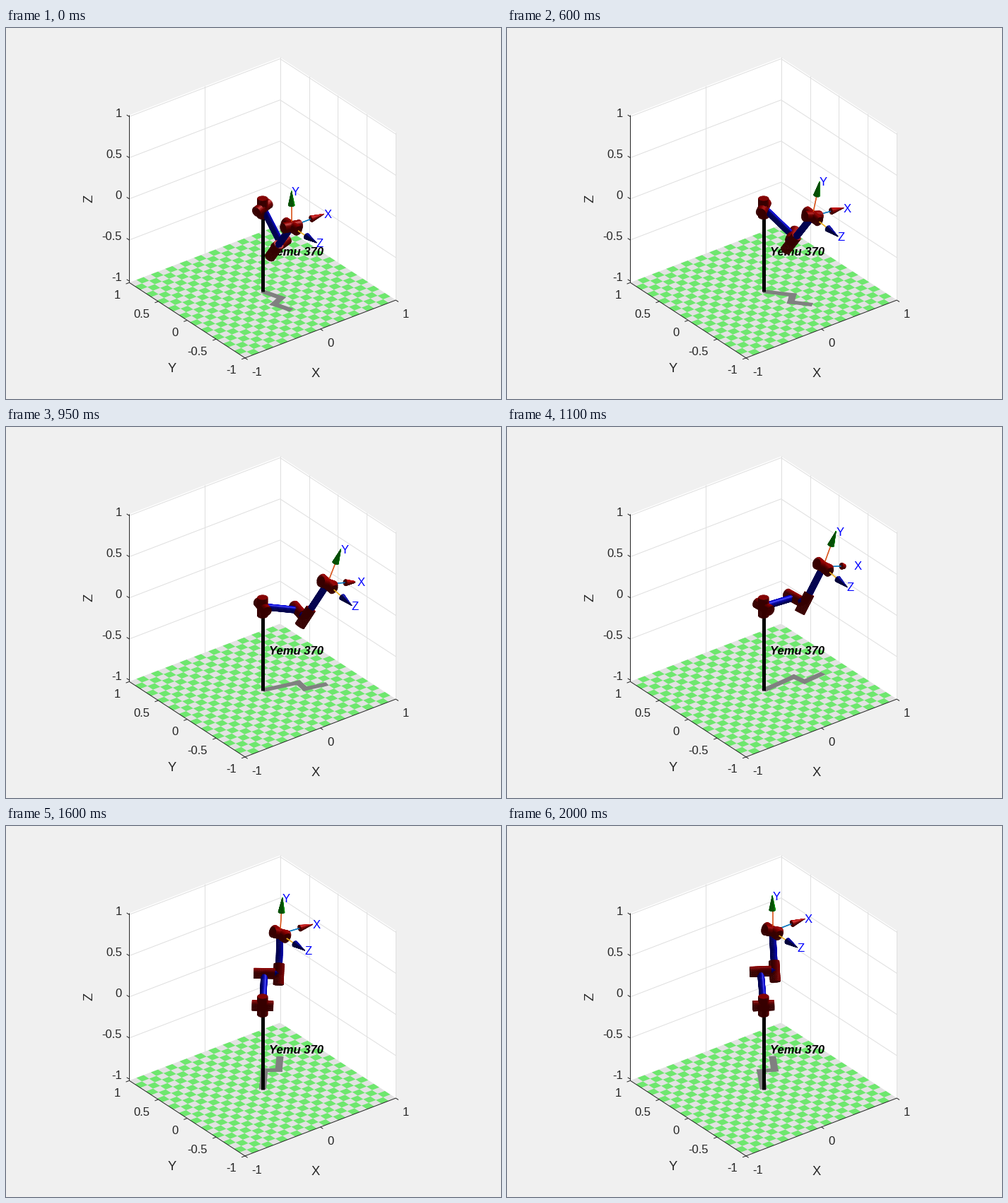
Animation of 700 by 525 pixels, one loop 2050 ms. Source, as a matplotlib script:

```python
import numpy as np
import matplotlib.pyplot as plt
from matplotlib.animation import FuncAnimation
from matplotlib.collections import PolyCollection

W, H, DPI = 700, 525, 100
FRAMES, STEP = 41, 50
FONT = 'Liberation Sans'
INK = (0.15, 0.15, 0.15)

# Orthographic camera: azimuth -37.5, elevation 30 degrees
AZ, EL, SCALE = np.radians(-37.5), np.radians(30), 134.4
CENTER = np.array([362.8, 254.2])
RIGHT = np.array([np.cos(AZ), np.sin(AZ), 0])
VIEW = np.array([np.sin(AZ) * np.cos(EL), -np.cos(AZ) * np.cos(EL), np.sin(EL)])
UP = np.cross(VIEW, RIGHT)
LIGHT = np.array([1, 0, 1]) / np.sqrt(2)
ZLIM = 1.018

# Arm geometry (Denavit-Hartenberg)
A2, A3, D3, D4 = 0.4318, 0.0203, 0.15005, 0.4318
LINKS = list(zip([0, 0, D3, D4, 0, 0], [0, A2, A3, 0, 0, 0],
                 np.array([1, 0, -1, 1, -1, 0]) * np.pi / 2))
TOOL = np.array([[1, 0, 0], [0, 0, -1], [0, 1, 0]])

JOINT_R, JOINT_L, LINK_R = 0.054, 0.11, 0.034
RED, BLUE = (0.7, 0, 0), (0, 0, 1)
TIP, CONE_BASE, CONE_R = 0.43, 0.26, 0.034
CONES = [(0.85, 0, 0), (0, 1, 0), (0, 0, 0.75)]
STEMS = [(0, 0.447, 0.741), (0.85, 0.325, 0.098), (0.929, 0.694, 0.125)]


def project(p):
    p = np.asarray(p, float)
    return CENTER + SCALE * np.stack([p @ RIGHT, -(p @ UP)], axis=-1)


def chain(q):
    """Poses of the base and of every link frame."""
    T = np.eye(4)
    out = [T]
    for qi, (d, a, al) in zip(q, LINKS):
        c, s, ca, sa = np.cos(qi), np.sin(qi), np.cos(al), np.sin(al)
        T = T @ np.array([[c, -s * ca, s * sa, a * c],
                          [s, c * ca, -c * sa, a * s],
                          [0, sa, ca, d],
                          [0, 0, 0, 1]])
        out.append(T)
    return out


def solve(x, y, z):
    """Elbow-down joint angles that bring the tool to a point."""
    r = np.hypot(x, y)
    rho = np.sqrt(r * r - D3 * D3)
    q1 = np.arctan2(y, x) + np.arcsin(D3 / r)
    dist = np.hypot(rho, z)
    bend = np.arccos((dist**2 + A2**2 - A3**2 - D4**2) / (2 * dist * A2))
    q2 = np.arctan2(z, rho) - bend
    fore = np.arctan2(z - A2 * np.sin(q2), rho - A2 * np.cos(q2))
    q3 = fore - np.arctan2(D4, A3) - q2
    M = chain([q1, q2, q3])[3][:3, :3].T @ TOOL
    return np.array([q1, q2, q3, np.arctan2(M[1, 2], M[0, 2]),
                     -np.arccos(M[2, 2]), np.arctan2(M[2, 1], -M[2, 0])])


START, END = solve(0, -0.5, 0), solve(0.5, 0.5, 0.5)


def pose(i):
    t = i / (FRAMES - 1)
    return START + (END - START) * (10 * t**3 - 15 * t**4 + 6 * t**5)


def shade(n, color):
    nl = n @ LIGHT
    refl = 2 * nl[:, None] * n - LIGHT
    spec = np.where(nl > 0, np.clip(refl @ VIEW, 0, 1)**10, 0)
    lit = 0.3 + 0.6 * np.clip(nl, 0, 1)
    return np.clip(lit[:, None] * np.array(color) + 0.3 * spec[:, None], 0, 1)


def solid(p, axis, t0, t1, r0, r1, color, n=28):
    """Visible facets of a cylinder or cone: corners and colours."""
    axis = axis / np.linalg.norm(axis)
    helper = np.eye(3)[np.argmin(np.abs(axis))]
    u = np.cross(axis, helper)
    u /= np.linalg.norm(u)
    w = np.cross(axis, u)
    m = max(2, int(np.ceil((t1 - t0) / 0.02)))
    t, r = np.linspace(t0, t1, m + 1), np.linspace(r0, r1, m + 1)
    th = np.linspace(0, 2 * np.pi, n + 1)

    def ring(a):
        return np.cos(a)[:, None] * u + np.sin(a)[:, None] * w

    grid = p + t[:, None, None] * axis + r[:, None, None] * ring(th)
    side = np.stack([grid[:-1, :-1], grid[:-1, 1:], grid[1:, 1:], grid[1:, :-1]], axis=2)
    normal = ring((th[:-1] + th[1:]) / 2) + (r0 - r1) / (t1 - t0) * axis
    normal /= np.linalg.norm(normal, axis=1)[:, None]
    quads, normals = [side.reshape(-1, 4, 3)], [np.tile(normal, (m, 1))]
    for k, sign in ((0, -1), (-1, 1)):
        mid = np.broadcast_to(p + t[k] * axis, (n, 3))
        quads.append(np.stack([mid, grid[k, :-1], grid[k, 1:], mid], axis=1))
        normals.append(np.tile(sign * axis, (n, 1)))
    quads, normals = np.concatenate(quads), np.concatenate(normals)
    seen = normals @ VIEW > 0
    return quads[seen], shade(normals[seen], color)


def rod(a, b, color):
    d = b - a
    return solid(a, d, 0, np.linalg.norm(d), LINK_R, LINK_R, color)


def stem(p, axis, color, n=16):
    """One-pixel line as thin facets facing the camera."""
    off = np.cross(VIEW, axis)
    off *= 0.5 / SCALE / max(np.linalg.norm(off), 1e-6)
    pts = p + np.linspace(0, CONE_BASE, n + 1)[:, None] * axis
    a, b = pts[:-1], pts[1:]
    return np.stack([a - off, a + off, b + off, b - off], axis=1), np.tile(color, (n, 1))


def robot(F):
    pos = [T[:3, 3] for T in F]
    parts = [solid(pos[k], F[k][:3, 2], -JOINT_L, JOINT_L, JOINT_R, JOINT_R, RED)
             for k in range(6)]
    side = pos[2] + D3 * F[2][:3, 2]
    parts += [rod(pos[1], pos[2], BLUE), rod(pos[2], side, BLUE), rod(pos[3], pos[4], BLUE)]
    for k in range(3):
        axis = F[6][:3, k]
        parts.append(stem(pos[6], axis, STEMS[k]))
        parts.append(solid(pos[6], axis, CONE_BASE, TIP, CONE_R, 0.001, CONES[k], 20))
    quads = np.concatenate([a for a, _ in parts])
    cols = np.concatenate([c for _, c in parts])
    mid = quads.mean(axis=1)
    keep = mid[:, 0] <= 1
    quads, cols, depth = quads[keep], cols[keep], (mid @ VIEW)[keep]
    order = np.argsort(depth)
    return project(quads[order]), cols[order]


def shadow(F):
    """Floor ribbon below the links."""
    pts = [F[k][:2, 3] for k in (0, 2, 3, 4)]
    half, out = 0.0375, []
    for k in range(3):
        a, b = pts[k], pts[k + 1]
        d = (b - a) / np.linalg.norm(b - a) * half
        a = a - d * (k > 0)
        b = b + d * (k < 2)
        n = np.array([-d[1], d[0]])
        flat = np.array([a + n, b + n, b - n, a - n])
        out.append(project(np.column_stack([flat, np.full(4, -ZLIM)])))
    return out


fig = plt.figure(figsize=(W / DPI, H / DPI), dpi=DPI, facecolor=(240 / 255,) * 3)
ax = fig.add_axes([0, 0, 1, 1])
ax.set_xlim(0, W)
ax.set_ylim(H, 0)
ax.axis('off')


def poly(pts, color, z):
    ax.add_collection(PolyCollection(project(pts), facecolors=[color], linewidths=0, zorder=z))


def line(a, b, color, px=1, z=2):
    (x0, y0), (x1, y1) = project([a, b])
    ax.plot([x0, x1], [y0, y1], color=color, lw=px * 72 / DPI, zorder=z,
            solid_capstyle='butt')


def label(x, y, s, ha='center', size=12, z=2, **kw):
    return ax.text(x, y + size / 2, s, ha=ha, va='baseline', fontsize=size,
                   family=FONT, zorder=z, **{'color': INK, **kw})


def draw_stage():
    L = ZLIM
    poly([[(-1, 1, -L), (1, 1, -L), (1, 1, L), (-1, 1, L)],
          [(1, 1, -L), (1, -1, -L), (1, -1, L), (1, 1, L)]], (1, 1, 1), 0)
    grid = (0.873,) * 3
    for z in (-0.5, 0, 0.5, 1):
        line((-1, 1, z), (1, 1, z), grid, z=0.5)
        line((1, 1, z), (1, -1, z), grid, z=0.5)
    for x in (0, 1):
        line((x, 1, -L), (x, 1, L), grid, z=0.5)
    for y in (0.5, 0, -0.5, -1):
        line((1, y, -L), (1, y, L), grid, z=0.5)

    n = 21
    e = np.linspace(-1, 1, n + 1)
    poly([[(-1, -1, -L), (1, -1, -L), (1, 1, -L), (-1, 1, -L)]], (0.888,) * 3, 1)
    poly([[(e[i], e[j], -L), (e[i + 1], e[j], -L),
           (e[i + 1], e[j + 1], -L), (e[i], e[j + 1], -L)]
          for i in range(n) for j in range(n) if (i + j) % 2], (0.43, 0.905, 0.43), 1.1)

    line((-1, 1, -L), (-1, 1, L), INK)
    line((-1, 1, -L), (-1, -1, -L), INK)
    line((-1, -1, -L), (1, -1, -L), INK)
    tick = 0.045
    for k, v in enumerate((1, 0.5, 0, -0.5, -1)):
        s = f'{v:g}'
        line((-1, 1, v), (-1, 1 + tick, v), INK)
        label(164, 119.5 + 58.2 * k, s, 'right')
        line((-1, v, -L), (-1 - tick, v, -L), INK)
        label(162 + 40.9 * k, 377 + 26.6 * k, s, 'right')
    for k, v in enumerate((-1, 0, 1)):
        line((v, -1, -L), (v, -1 - tick, -L), INK)
        label(347.5 + 106.7 * k, 486 - 41 * k, f'{v}', 'left')
    label(437.5, 487, 'X', size=13.2)
    label(235, 480, 'Y', size=13.2)
    ax.text(117.5, 241.5, 'Z', rotation=90, ha='center', va='center',
            fontsize=13.2, family=FONT, color=INK)
    line((0, 0, -L), (0, 0, 0), 'black', 5, 4)
    label(371.5, 316, 'Yemu 370', 'left', z=4, color='black',
          weight='bold', style='italic')


draw_stage()
shade_art = PolyCollection([], facecolors=[(0.5,) * 3], linewidths=0, zorder=3)
body = PolyCollection([], linewidths=0.4, zorder=5)
ax.add_collection(shade_art)
ax.add_collection(body)
tags = [label(0, 0, s, 'left', z=6, color='blue') for s in 'XYZ']


def update(i):
    F = chain(pose(i))
    shade_art.set_verts(shadow(F))
    quads, cols = robot(F)
    body.set_verts(quads)
    body.set_facecolor(cols)
    body.set_edgecolor(cols)
    for k, tag in enumerate(tags):
        x, y = project(F[6][:3, 3] + TIP * F[6][:3, k])
        tag.set_position((x, y + 6))
    return [shade_art, body, *tags]


anim = FuncAnimation(fig, update, frames=FRAMES, interval=STEP, repeat=True,
                     repeat_delay=0, blit=False)
plt.show()
```
